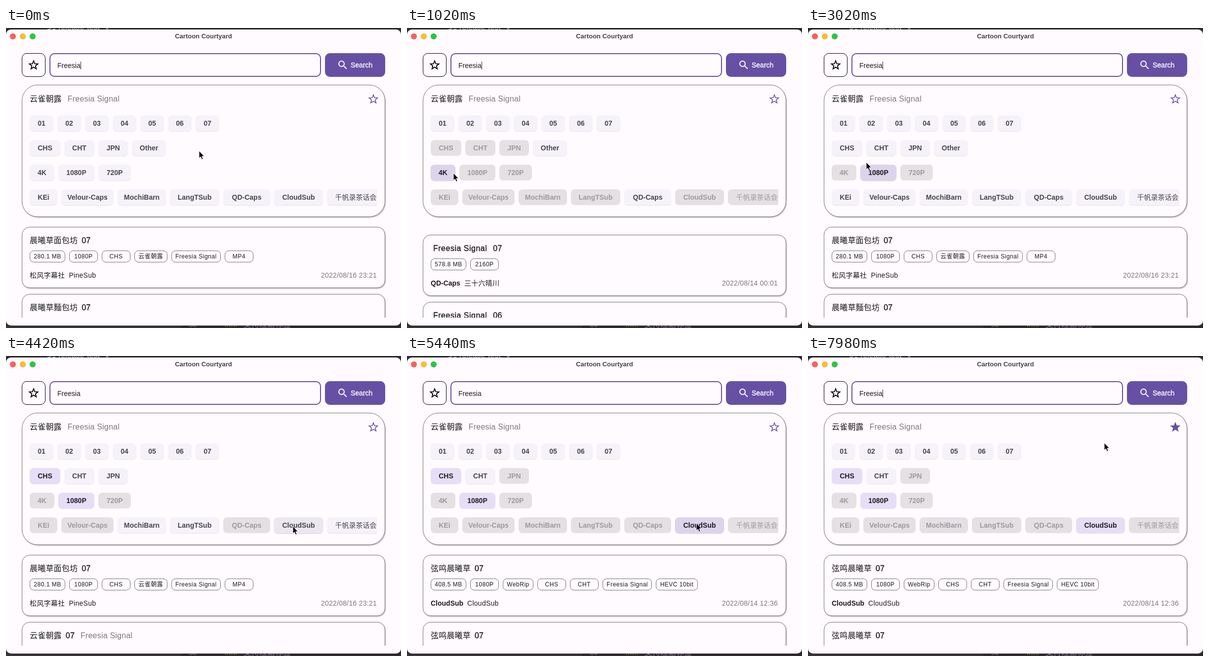
Write an HTML page that moves like this. It is 800 px wide and 608 px high and loops after 8 s.

```html
<!DOCTYPE html>
<html lang="zh">
<head>
<meta charset="utf-8">
<title>Cartoon Courtyard</title>
<style>
  * { box-sizing: border-box; }
  html, body { margin: 0; width: 100%; height: 100%; overflow: hidden; background: #2e2a2d; }
  body { font: 14px/24px "Liberation Sans", "Noto Sans CJK SC", "Noto Sans CJK", sans-serif; color: #1c1b1f; }
  div, svg, .abs { position: absolute; white-space: pre; }
  #stage { left: 0; top: 0; width: 800px; height: 608px; overflow: hidden; }
  #window { left: 0; top: 3px; width: 800px; height: 600px; border-radius: 10px; background: #fffbff; }
  .light { top: 11px; width: 12px; height: 12px; border-radius: 50%; box-shadow: inset 0 0 0 .5px rgba(0,0,0,.15); }
  #caption { left: 0; width: 800px; top: 5px; text-align: center; font-weight: bold; font-size: 13px; color: #454246; }
  .box { top: 51px; height: 48px; border-radius: 10px; line-height: 48px; }
  .panel { left: 32px; width: 736px; border: 1px solid #77727a; background: #fffbff; box-shadow: 1px 1.5px 2px rgba(0,0,0,.28); }
  .title { font-size: 16px; letter-spacing: .2px; }
  .title span { margin-right: 8px; }
  .medium { -webkit-text-stroke: .35px; }
  .grey { color: #7b777e; }
  #chips { left: 44px; top: 170px; width: 708px; height: 200px; overflow: hidden; }
  .chip { height: 32px; border-radius: 8px; line-height: 32px; text-align: center; font-weight: bold; }
  .cjk { font-weight: 500; }
  #list { left: 0; top: 395px; width: 800px; height: 192px; overflow: hidden; }
  .card { height: 124px; border-radius: 16px; }
  .tags { left: 15px; top: 47px; display: flex; gap: 8px; }
  .tags span { min-width: 58px; height: 24px; padding: 0 7.3px; border: 1px solid #77727a; border-radius: 8px;
    font-size: 12px; line-height: 22px; letter-spacing: .5px; text-align: center; }
  .foot { left: 15px; right: 15px; top: 85px; letter-spacing: .25px; }
  .foot b { margin-right: 8px; letter-spacing: 0; }
  .foot .grey { position: absolute; right: 1px; }
</style>
</head>
<body>
<div id="stage">
  <div style="left:0;top:603px;width:355px;height:5px;background:#393337"></div>
  <div style="left:83px;top:-10px;font-size:16px;line-height:16px;color:#aaa">⎇ release-test  ⌄</div>
  <div style="left:371px;top:592px;line-height:18px;color:#777">50</div>
  <div style="left:443px;top:592px;font-size:16px;line-height:18px;color:#b9863f">###</div>
  <div style="left:481px;top:592px;font-size:16px;line-height:18px;color:#8a6a9c">支持过滤标签</div>
  <div id="window"></div>
  <div class="light" style="left:8px;background:#ff5f57"></div>
  <div class="light" style="left:28px;background:#febc2e"></div>
  <div class="light" style="left:48px;background:#28c840"></div>
  <div id="caption">Cartoon Courtyard</div>

  <div class="box" style="left:32px;width:48px;border:1px solid #000"></div>
  <svg style="left:44px;top:63px" width="24" height="24"><path class="star" fill="none" stroke="#000" stroke-width="1.8"/></svg>
  <div class="box" style="left:88px;width:550px;border:2px solid #6750a4"></div>
  <div style="left:104px;top:64px">Freesia<span id="caret" class="abs" style="left:100%;top:4px;width:1px;height:16px;background:#222"></span></div>
  <div class="box" style="left:646px;width:122px;background:#6750a4"></div>
  <svg style="left:670px;top:63px" width="24" height="24" fill="none" stroke="#fff" stroke-width="2">
    <circle cx="9.5" cy="9.5" r="5.5"/><path d="M14 14l5.8 5.8"/></svg>
  <div class="medium" style="left:698px;top:63px;color:#fff">Search</div>

  <div class="panel" style="top:115px;height:268px;border-radius:32px"></div>
  <div class="title" style="left:48px;top:132px"><span class="cjk" style="margin-right:12px">云雀朝露</span><span class="grey">Freesia Signal</span></div>
  <svg style="left:732px;top:132px" width="24" height="24"><path id="favorite" class="star" stroke="#6750a4" stroke-width="1.6"/></svg>
  <div id="chips"></div>
  <div id="list"></div>
  <svg id="cursor" style="left:0;top:0;overflow:visible" width="12" height="18">
    <path d="M0 -1V14L3.3 10.9 5.6 16.4 8.2 15.3 5.9 10H10.4Z" stroke="#fff" stroke-width="1"/></svg>
</div>
<script>
const $ = id => document.getElementById(id);
const add = (parent, cls, html) => {
  const el = document.createElement('div');
  el.className = cls;
  el.innerHTML = html;
  return parent.appendChild(el);
};

for (const star of document.querySelectorAll('.star')) {
  let d = '';
  for (let i = 0; i < 10; i++) {
    const r = i % 2 ? 3.9 : 9, a = i * Math.PI / 5;
    d += (i ? 'L' : 'M') + (12 + r * Math.sin(a)) + ' ' + (12.5 - r * Math.cos(a));
  }
  star.setAttribute('d', d + 'Z');
}

const rows = [
  ['01 02 03 04 05 06 07', [48, 48, 48, 48, 48, 48, 48]],
  ['CHS CHT JPN Other', [62, 61, 60, 69]],
  ['4K 1080P 720P', [50, 73, 66]],
  ['KEi Velour-Caps MochiBarn LangTSub QD-Caps CloudSub 千帆录茶话会', [56, 106, 98, 100, 95, 99, 117]],
];
const chips = rows.flatMap(([names, widths], row) => {
  let x = 48;
  const y = 177 + row * 50;
  return names.split(' ').map((name, col) => {
    const el = add($('chips'), 'chip' + (name > '一' ? ' cjk' : ''), name), w = widths[col];
    el.style.cssText = `left:${x - 44}px;top:${y - 170}px;width:${w}px`;
    const chip = { el, name, row, col, x, y, w };
    x += w + 8;
    return chip;
  });
});

const makeCard = (title, tags, foot, date) => add($('list'), 'panel card',
  `<div class="title" style="left:15px;top:15px">${title}</div>
   <div class="tags">${tags.split(',').map(s => `<span>${s}</span>`).join('')}</div>
   <div class="foot">${foot}<span class="grey">${date}</span></div>`);
const heading = (name, ep, extra = '') =>
  `<span class="cjk">${name}</span><span class="medium" style="margin-right:12px">${ep}</span><span class="grey">${extra}</span>`;
const latin = ep => `<span class="medium" style="margin:0 12px 0 5px;letter-spacing:.5px">Freesia Signal</span><span class="medium">${ep}</span>`;
const pine = '<span class="cjk">松风字幕社</span>  PineSub';
const caps = '<b>QD-Caps</b>三十六晴川';
const cloud = '<b>CloudSub</b>CloudSub';
const cloudTags = '408.5 MB,1080P,WebRip,CHS,CHT,Freesia Signal,HEVC 10bit';
const cards = [
  makeCard(heading('晨曦草面包坊', '07'), '280.1 MB,1080P,CHS,云雀朝露,Freesia Signal,MP4', pine, '2022/08/16 23:21'),
  makeCard(heading('晨曦草麵包坊', '07'), '270.2 MB,1080P,CHT,雲雀朝露,Freesia Signal,MP4', pine, '2022/08/16 23:21'),
  makeCard(latin('07'), '578.8 MB,2160P', caps, '2022/08/14 00:01'),
  makeCard(latin('06'), '578.8 MB,2160P', caps, '2022/08/14 00:01'),
  makeCard(heading('云雀朝露', '07', 'Freesia Signal'), '280.1 MB,1080P,CHS', pine, '2022/08/16 23:21'),
  makeCard(heading('弦鸣晨曦草', '07'), cloudTags, cloud, '2022/08/14 12:36'),
  makeCard(heading('弦鸣晨曦草', '07'), cloudTags, cloud, '2022/08/14 12:36'),
];

// Chip states per row: Normal, Disabled, Selected, Hidden
const all = 'NNNNNNN';
const free = [all, 'NNNN', 'NNN', all];
const steps = [
  { at: 0, chips: free, list: [0, 1], from: [0, 0] },
  { at: 800, chips: [all, 'DDDN', 'SDD', 'DDDDNDD'], list: [2, 3], from: [240, 240] },
  { at: 2005, chips: free, list: [0, 1], from: [0, -136] },
  { at: 2740, chips: [all, 'NNNN', 'DSD', all], list: [0, 1], from: [0, 0] },
  { at: 3600, chips: [all, 'SNNH', 'DSD', 'DDNNDNN'], list: [0, 4], from: [0, 136] },
  { at: 4560, chips: [all, 'SNDH', 'DSD', 'DDDDDSD'], list: [5, 6], from: [240, 240] },
];
const looks = {
  N: ['#f6f2fa', '#49454f'], D: ['#e4e0e4', '#9d99a0'], S: ['#e6def6', '#1d1b20'], H: ['#fff', '#fff'],
};

// Pointer keys: time, x, y
const path = [
  [20, 391, 250], [700, 94, 295], [1760, 94, 295], [2000, 96, 296], [2220, 127, 299], [2520, 149, 291],
  [2560, 149, 291], [2580, 120, 286], [2740, 120, 286], [3020, 118, 273], [3420, 85, 246], [3640, 85, 246],
  [4340, 581, 346], [5260, 581, 346], [5280, 584, 345], [5420, 584, 345], [5440, 586, 340],
  [6220, 744, 152], [6260, 744, 152], [6280, 746, 152], [6740, 746, 152], [6900, 751, 152],
  [7100, 746, 151], [7320, 746, 151], [7580, 627, 177], [7940, 627, 177], [7980, 600, 177],
];
function pointer(t) {
  const i = path.findIndex(p => p[0] > t);
  if (i < 1) return path[i ? path.length - 1 : 0].slice(1);
  const a = path[i - 1], b = path[i], u = (t - a[0]) / (b[0] - a[0]), e = u * u * (3 - 2 * u);
  return [a[1] + (b[1] - a[1]) * e, a[2] + (b[2] - a[2]) * e];
}
// Critically damped spring: share of the distance still to go
const spring = ms => ms > 540 ? 0 : (1 + ms / 50) * Math.exp(-ms / 50);

function draw() {
  const t = performance.now() % 8000;
  const step = steps.findLast(s => s.at <= t);
  const [px, py] = pointer(t);
  $('cursor').style.transform = `translate(${px}px,${py}px)`;

  for (const c of chips) {
    const state = step.chips[c.row][c.col], [back, ink] = looks[state], s = c.el.style;
    const hover = state != 'D' && px >= c.x && px <= c.x + c.w && py >= c.y - 8 && py < c.y + 40;
    const ripple = c.name == '4K' && t >= 2005 && t < 2400;
    const shade = ripple ? .1 * Math.min(1, (2400 - t) / 150) : hover ? .05 : 0;
    s.background = `linear-gradient(rgba(29,27,32,${shade}),rgba(29,27,32,${shade})),${back}`;
    s.color = ink;
    s.visibility = state == 'H' ? 'hidden' : '';
    s.boxShadow = state == 'D' ? 'none' : hover ? '0 1px 2px rgba(0,0,0,.2)' : '0 1px 1px rgba(0,0,0,.11)';
  }

  const left = spring(t - step.at);
  cards.forEach((card, id) => {
    const slot = step.list.indexOf(id);
    card.style.display = slot < 0 ? 'none' : '';
    if (slot < 0) return;
    card.style.top = 8 + slot * 136 + Math.round(step.from[slot] * left) + 'px';
    card.style.zIndex = 2 - slot;
  });

  const blink = (t + 470) % 1000 < 500 && !(t > 1500 && t < 1760);
  $('caret').style.visibility = blink ? '' : 'hidden';
  $('favorite').setAttribute('fill', t >= 6500 ? '#6750a4' : 'none');
  requestAnimationFrame(draw);
}
draw();
</script>
</body>
</html>
```
